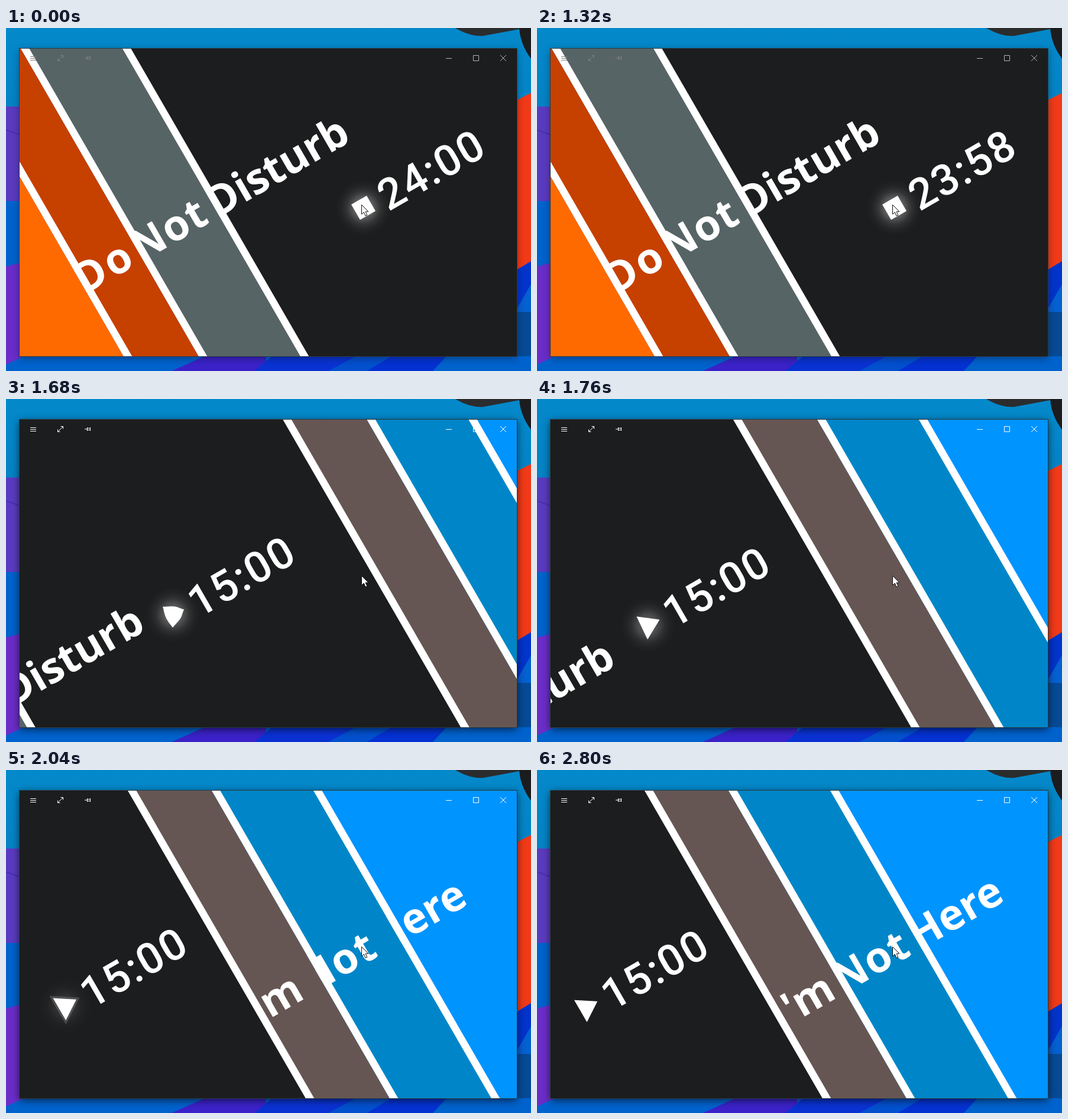
These frames come from a looping animation (888x581 px, 3440 ms). An HTML page:

```html
<!DOCTYPE html>
<html lang="en">
<head>
<meta charset="utf-8">
<title>Status timer</title>
<style>
  html, body { margin: 0; width: 100%; height: 100%; overflow: hidden; background: #0487c8; }
  svg { display: block; width: 100vw; height: 100vh; }
  .title { font: 700 72px "Open Sans", "Noto Sans", sans-serif; fill: #fff; }
  .time { font: 500 73px Roboto, Inter, sans-serif; letter-spacing: 2.2px; fill: #fff; }
  .glyph { fill: none; stroke: #fff; stroke-width: 1; }
</style>
</head>
<body>
<svg viewBox="0 0 888 581" preserveAspectRatio="none">
  <defs>
    <clipPath id="win"><rect x="23" y="35" width="841" height="521"/></clipPath>
    <filter id="blur" x="-10%" y="-10%" width="120%" height="120%"><feGaussianBlur stdDeviation="7"/></filter>
    <radialGradient id="halo">
      <stop offset="0" stop-color="#fff" stop-opacity=".4"/>
      <stop offset=".35" stop-color="#fff" stop-opacity=".28"/>
      <stop offset=".6" stop-color="#fff" stop-opacity=".1"/>
      <stop offset=".8" stop-color="#fff" stop-opacity=".03"/>
      <stop offset="1" stop-color="#fff" stop-opacity="0"/>
    </radialGradient>
    <linearGradient id="sky" x2="0" y2="1">
      <stop offset="0" stop-color="#0489cb"/><stop offset="1" stop-color="#0482c4"/>
    </linearGradient>
  </defs>

  <!-- desktop -->
  <rect width="888" height="581" fill="#0062cc"/>
  <rect width="888" height="134" fill="url(#sky)"/>
  <path d="M0 133H60V293H0z" fill="#5a3bc0"/>
  <path d="M0 173Q12 176 30 184" fill="none" stroke="#4a2fae" stroke-width="2"/>
  <path d="M0 404L30 396V556L0 570z" fill="#6a2dc8"/>
  <path d="M280 581L336 556H440V581z" fill="#3a22c8"/>
  <path d="M420 581L450 556H592L546 581z" fill="#0a32d2"/>
  <path d="M546 581L592 556H652L610 581z" fill="#0250ce"/>
  <path d="M610 581L652 556H745L722 581z" fill="#0432d2"/>
  <path d="M760 0Q784 14 806 13.500L868 2V0z" fill="#2b2c2e"/>
  <path d="M868 0H888V52Q870 28 868 0z" fill="#1b1c1e"/>
  <path d="M850 129L888 110V395L850 418z" fill="#f03a18"/>
  <path d="M850 418L888 395V481H850z" fill="#0234cc"/>
  <path d="M850 500L888 434V481H850z" fill="#0560d0"/>
  <path d="M850 481H888V556H850z" fill="#064a96"/>

  <!-- window -->
  <rect id="shadow" x="23" y="38" width="841" height="521" filter="url(#blur)"/>
  <rect x="22.500" y="34.500" width="842" height="522" fill="#1c1d1e" stroke="#2c3a40"/>
  <g clip-path="url(#win)">
    <g transform="rotate(-30)"><g id="strip"></g></g>
    <g id="icon">
      <circle id="glow" r="47" fill="url(#halo)"/>
      <path id="rim" fill="none" stroke="#fff" stroke-width="7" stroke-opacity=".16"/>
      <path id="shape" fill="#fff"/>
    </g>
    <g id="clock"><text class="time" transform="rotate(-30)" x="404.800" y="593"></text></g>
  </g>

  <!-- caption buttons -->
  <g id="left" class="glyph">
    <path d="M41 48.500H51M41 51.500H51M41 54.500H51"/>
    <path d="M87.500 55.500L96.500 46.500M92.500 46.500H96.500V50.500M87.500 51.500V55.500H91.500"/>
    <path d="M133 51H137M137.500 48V54M137.500 49.500H142.500V52.500H137.500M142.500 48V54"/>
  </g>
  <g id="right" class="glyph">
    <path d="M744 51.500H754"/>
    <path d="M790.500 46.500H799.500V55.500H790.500z"/>
    <path d="M836 46L846 56M846 46L836 56"/>
  </g>
  <path d="M601.500 299.500V315.500L605.300 312L608 318.300L610.800 317.100L608.100 311H613z" fill="#fff" stroke="#111"/>
</svg>
<script>
const LOOP = 3440, STEP = 40, TRAVEL = 749, PRESS = 1480, COS = Math.cos(Math.PI / 6);
const BAR = 12.5;
const $ = id => document.getElementById(id);
const clamp = x => Math.max(0, Math.min(1, x));
const mix = (a, b, p) => a + (b - a) * p;

function add(parent, tag, attrs, text) {
  const el = document.createElementNS("http://www.w3.org/2000/svg", tag);
  for (const k in attrs) el.setAttribute(k, attrs[k]);
  if (text) el.textContent = text;
  parent.appendChild(el);
  return el;
}

// Bars cross the window's top edge at these x positions, tilted by 30 degrees.
const bars = [-102, 25, 197, 931, 1073, 1245].map(x => x * COS - 17.5);
const edges = [-900, ...bars, 2200];
const fills = ["#ff6a00", "#c64000", "#566466", "#1c1d1e", "#665653", "#0086c8", "#0094ff"];
const strip = $("strip");
fills.forEach((fill, i) =>
  add(strip, "rect", { x: edges[i], y: 0, width: edges[i + 1] - edges[i], height: 960, fill }));
bars.forEach(x => add(strip, "rect", { x, y: 0, width: BAR, height: 960, fill: "#fff" }));

// Each word hangs on a bar, which doubles as its first stem.
const words = [
  ["Do", 4, 458], ["Not", 1.5, 458], ["Disturb", -0.5, 458],
  ["I'm", 1.5, 588, 1], ["Not", 1.5, 588, 1.12], ["Here", 0, 588, 1.42]
].map(([text, gap, y, slide = 0], i) => {
  const clip = add(document.querySelector("defs"), "clipPath", { id: "panel" + i });
  add(clip, "rect", { x: bars[i], y: 0, width: edges[i + 2] - bars[i], height: 960 });
  const box = add(strip, "g", { "clip-path": `url(#panel${i})` });
  const el = add(box, "text", { class: "title", x: bars[i] - 6.2, y, style: `letter-spacing:${gap}px` }, text);
  return { el, slide };
});

// Exponential decay through [time, value] points.
function decay(keys, t) {
  if (t <= keys[0][0]) return keys[0][1];
  for (let i = 1; i < keys.length; i++) {
    const [t0, a] = keys[i - 1], [t1, b] = keys[i];
    if (t < t1) return a * Math.pow(b / a, (t - t0) / (t1 - t0));
  }
  return 0;
}
const scrollKeys = [[1560, TRAVEL], [1600, 547], [1760, 150], [2040, 24], [2320, 3], [2800, 0.05]];
const slideKeys = [[1760, 160], [2040, 22.5], [2320, 5], [2800, 0.05]];

// Distance from the centre to a polygon's edge, given edges as [normal angle, distance].
const radius = (sides, a) => Math.min(...sides.map(([n, d]) => {
  const c = Math.cos((a - n) * Math.PI / 180);
  return c > 0.01 ? d / c : Infinity;
}));
const square = [[0, 15], [90, 15], [180, 15], [270, 15]];
const play = [[180, 11], [56.8, 12.05], [-56.8, 12.05]];

function iconPath(round, tri) {
  let d = "";
  for (let a = 0; a < 360; a += 3) {
    const r = mix(mix(radius(square, a), 17.7, round), radius(play, a), tri);
    const w = a * Math.PI / 180;
    d += `${d ? "L" : "M"}${(r * Math.cos(w)).toFixed(2)} ${(r * Math.sin(w)).toFixed(2)}`;
  }
  return d + "z";
}

function draw(t) {
  const s = TRAVEL - decay(scrollKeys, t);
  const active = t >= PRESS;
  strip.setAttribute("transform", `translate(${-s * COS})`);
  // Old words slip behind their bars while the new ones come out.
  const slide = decay(slideKeys, t), leave = 100 * clamp((t - 1760) / 280);
  words.forEach(w => w.el.setAttribute("transform", `translate(${w.slide ? -w.slide * slide : -leave})`));

  $("clock").setAttribute("transform", `translate(${-0.694 * s} ${0.1303 * s})`);
  $("clock").firstChild.textContent = active ? "15:00" : t < 360 ? "24:00" : t < 1320 ? "23:59" : "23:58";

  const turn = active ? 6 * (1 - clamp((t - 1720) / 160)) * clamp((t - 1600) / 100) : 0;
  $("icon").setAttribute("transform", `translate(${604.5 - 0.696 * s} ${304.5 + 0.1313 * s}) rotate(${turn - 30})`);
  const d = iconPath(0.8 * clamp((t - PRESS) / 120), clamp((t - 1600) / 120));
  $("shape").setAttribute("d", d);
  $("rim").setAttribute("d", d);
  $("glow").setAttribute("opacity", clamp((2240 - t) / 640));
  $("rim").setAttribute("opacity", clamp((t - 1840) / 160) * clamp((2240 - t) / 200));

  $("left").style.stroke = active ? "#fff" : "#83807e";
  $("right").style.stroke = active ? "#fff" : "#b4b4b4";
  $("shadow").setAttribute("opacity", active ? 0.66 : 0.38);
}

// The picture advances 25 times a second.
const start = performance.now();
function tick() {
  const t = (performance.now() - start) % LOOP;
  draw(Math.floor(t / STEP) * STEP);
  requestAnimationFrame(tick);
}
tick();
</script>
</body>
</html>
```
